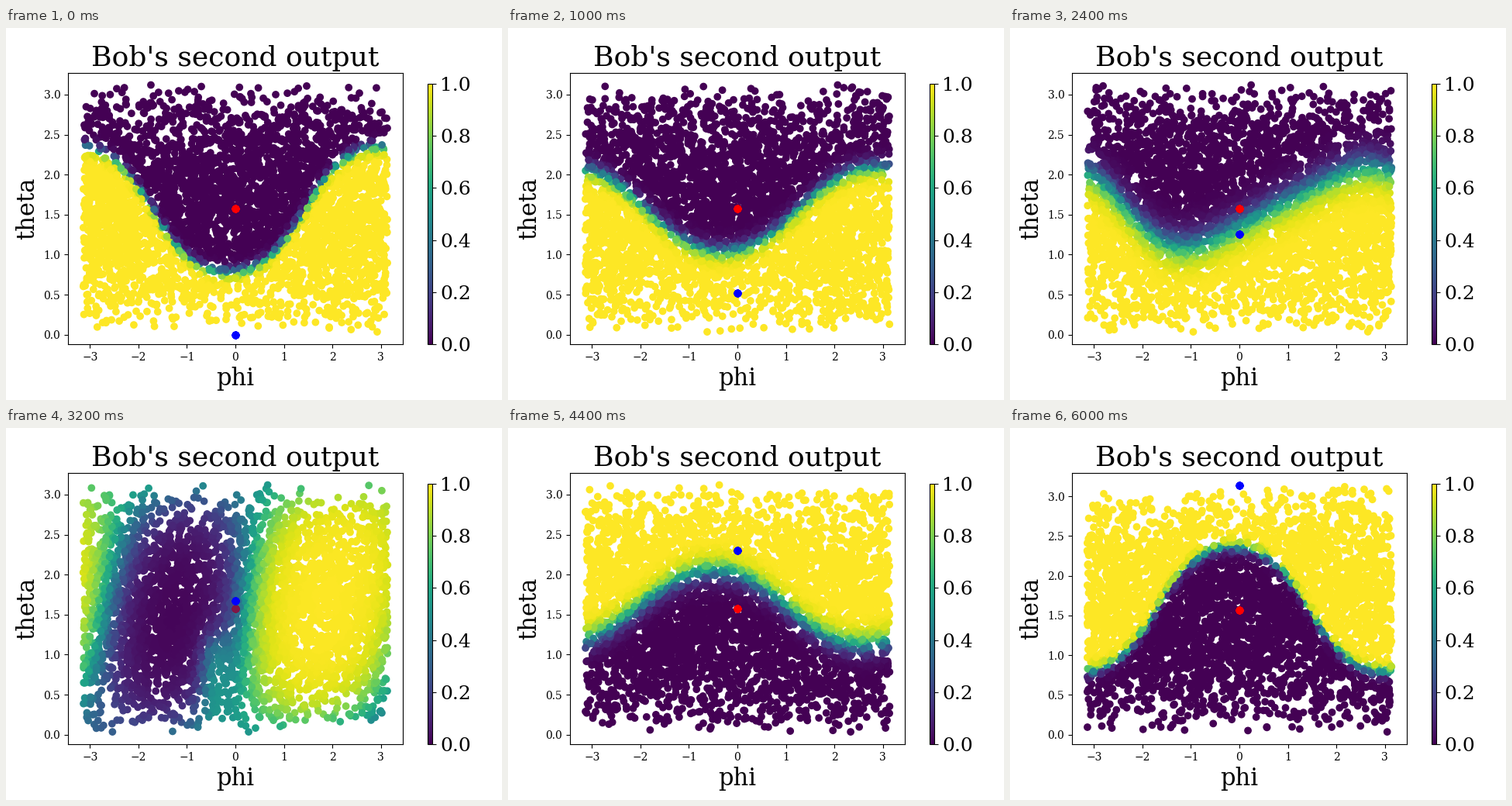
Write a matplotlib script that moves like this. It is 640 px wide and 480 px high and loops after 6.2 s.

```python
import numpy as np
import matplotlib.pyplot as plt
from matplotlib.animation import FuncAnimation
from matplotlib.cm import ScalarMappable

FRAMES, INTERVAL = 31, 200
COUNT = 4000
FLIP = 16            # step where the classifier swaps sides
LOW, HIGH = 0.035, 3.12

plt.rcParams["font.family"] = "DejaVu Serif"


def sigmoid(x):
    return 1 / (1 + np.exp(-np.clip(x, -50, 50)))


def swap_mix(k):
    """Weight of the undecided state around the swap, 0 to 1."""
    return max(0, 1 - abs(k - FLIP) / 4)


def edge_logit(k, phi, theta):
    """Great circle halfway between the two poles, blurred near the swap."""
    gap = abs(np.pi * k / (FRAMES - 1) - np.pi / 2)
    near = np.exp(-(gap / 0.9) ** 2)
    sign = 1 if k < FLIP else -1
    tilt = max(np.tan(gap / 2), 0.5)
    shift = -0.1 - 0.8 * near
    edge = np.pi / 2 - sign * np.arctan(tilt * np.cos(phi - shift))
    edge += 0.15 * near ** 4 * (0.5 + np.cos(2 * phi))
    return sign * (edge - theta) / (0.03 + 0.08 * near)


def swap_logit(phi, theta):
    """Undecided state: the value follows phi instead of theta."""
    p = phi - 0.15 * (theta - 1.2)
    wave = 4.8 * np.sin(p) - 1.24 * np.cos(p) + 0.76
    bump = 2.2 * np.exp(-((phi + 0.5) / 0.35) ** 2) * sigmoid((1.25 - theta) / 0.1)
    rim = 0.4 * np.cos(theta) * (1 - np.cos(phi))
    return np.sin(theta) ** 0.8 * (wave + bump) - rim


def output(k, phi, theta):
    mix = swap_mix(k)
    return sigmoid((1 - mix) * edge_logit(k, phi, theta)
                   + mix * swap_logit(phi, theta))


def sample(k):
    """Fresh points spread evenly over the sphere."""
    rng = np.random.default_rng(100 + k)
    phi = rng.uniform(-np.pi, np.pi, COUNT)
    theta = np.arccos(rng.uniform(-1, 1, COUNT))
    theta = LOW + (theta - theta.min()) * (HIGH - LOW) / np.ptp(theta)
    return phi, theta


fig = plt.figure(figsize=(6.4, 4.8), dpi=100)
ax = fig.add_axes([0.125, 0.15, 0.675, 0.73])
ax.set_title("Bob's second output", fontsize=26)
ax.set_xlabel("phi", fontsize=22)
ax.set_ylabel("theta", fontsize=22)
ax.set_xlim(-1.1 * np.pi, 1.1 * np.pi)

cloud = ax.scatter(np.zeros(COUNT), np.zeros(COUNT), c=np.zeros(COUNT),
                   cmap="viridis", vmin=0, vmax=1)
stack = np.zeros(20)  # overdrawn markers get crisp edges
red = ax.scatter(stack, stack + np.pi / 2, color="red")
blue = ax.scatter(stack, stack, color="blue")

cax = fig.add_axes([0.85, 0.15, 0.01, 0.7])
bar = fig.colorbar(ScalarMappable(cmap="viridis"), cax=cax)
bar.ax.tick_params(labelsize=18)


def draw(k):
    phi, theta = sample(k)
    cloud.set_offsets(np.column_stack([phi, theta]))
    cloud.set_array(output(k, phi, theta))

    angle = np.pi * k / (FRAMES - 1)
    blue.set_offsets(np.column_stack([stack, stack + angle]))
    mix = swap_mix(k)
    red.set_color((1 - 0.5 * mix, 0.09 * mix, 0.28 * mix))

    top = max(HIGH, angle)
    pad = 0.05 * (top - LOW)
    ax.set_ylim(LOW - pad, top + pad)
    return cloud, red, blue


anim = FuncAnimation(fig, draw, frames=FRAMES, interval=INTERVAL,
                     repeat=True, repeat_delay=0, blit=False)
plt.show()
```
